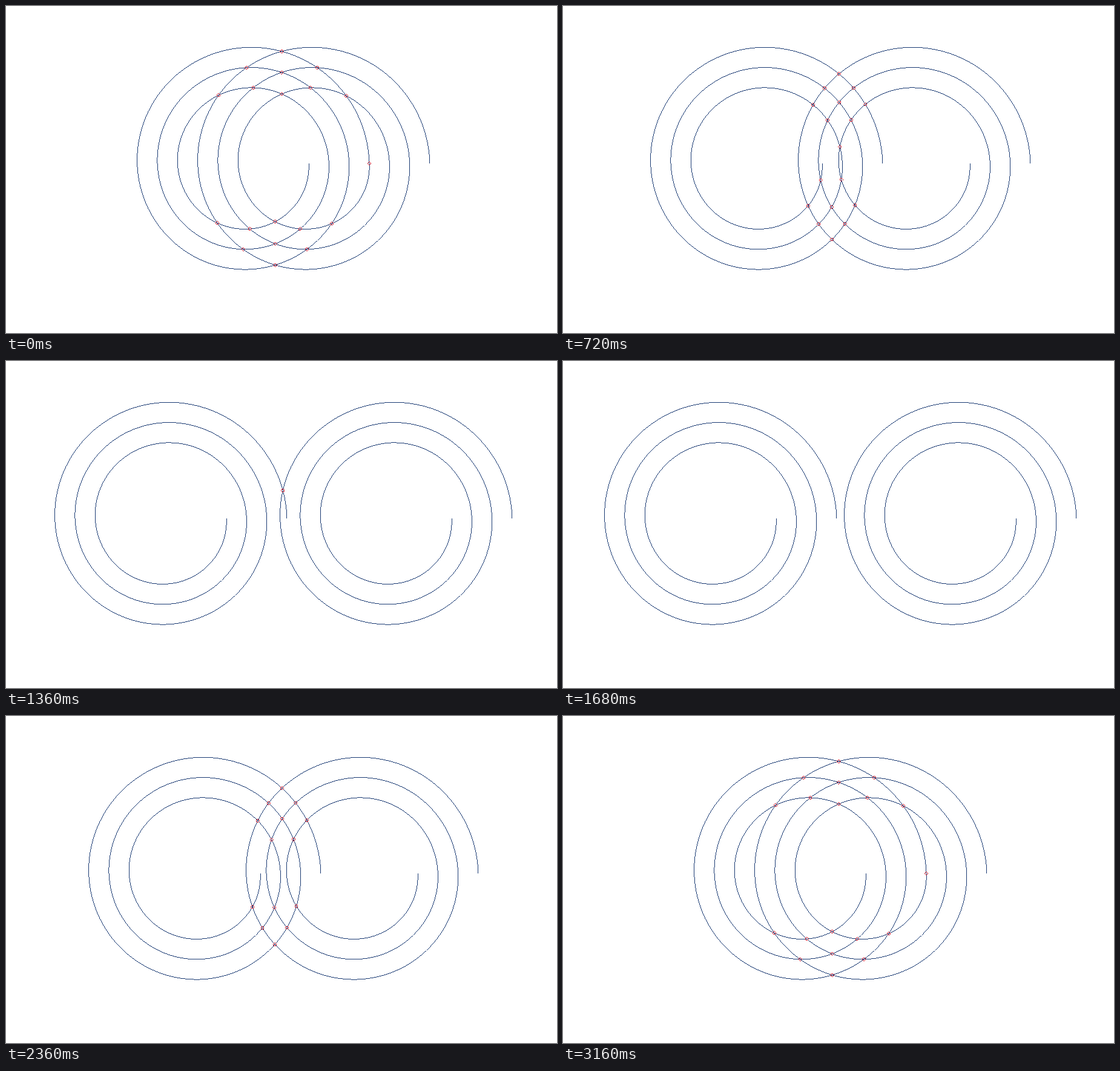
An HTML page with a canvas that plays this animation: 910 px wide and 540 px high, repeating every 3200 ms.

```html
<!DOCTYPE html>
<html lang="en">
<head>
<meta charset="utf-8">
<title>Crossing spirals</title>
<style>
  html, body { margin: 0; width: 100%; height: 100%; overflow: hidden; background: #fff; }
  canvas { display: block; }
</style>
</head>
<body>
<canvas id="stage" width="910" height="540"></canvas>
<script>
const ctx = document.getElementById('stage').getContext('2d');
const STEP = 40, FRAMES = 80, SEGMENTS = 360, TURNS = 3;
const BLUE = '#1c3c74', RED = '#d83040';

function spiral(cx) {
  return Array.from({ length: SEGMENTS + 1 }, (_, i) => {
    const part = i / SEGMENTS, angle = part * TURNS * 2 * Math.PI;
    const radius = 100 + 100 * part;
    return [cx + radius * Math.cos(angle), 260 + radius * Math.sin(angle)];
  });
}

function ring([x, y]) {
  return Array.from({ length: 25 }, (_, i) => {
    const angle = i * Math.PI / 12;
    return [x + 2.5 * Math.cos(angle), y + 2.5 * Math.sin(angle)];
  });
}

// Hard-edged polyline: one pixel for each pixel centre passed along the longer axis.
function drawLine(points, color) {
  ctx.fillStyle = color;
  for (let i = 1; i < points.length; i++) {
    const a = points[i - 1], b = points[i];
    const main = Math.abs(b[0] - a[0]) > Math.abs(b[1] - a[1]) ? 0 : 1;
    const side = 1 - main;
    const slope = (b[side] - a[side]) / (b[main] - a[main]);
    const end = Math.max(a[main], b[main]) - 0.5;
    const pixel = [0, 0];
    for (let m = Math.ceil(Math.min(a[main], b[main]) - 0.5); m < end; m++) {
      pixel[main] = m;
      pixel[side] = Math.floor(a[side] + (m + 0.5 - a[main]) * slope);
      ctx.fillRect(pixel[0], pixel[1], 1, 1);
    }
  }
}

function crossing(a, b, c, d) {
  const ux = b[0] - a[0], uy = b[1] - a[1];
  const vx = d[0] - c[0], vy = d[1] - c[1];
  const wx = c[0] - a[0], wy = c[1] - a[1];
  const det = ux * vy - uy * vx;
  if (Math.abs(det) < 1e-9) return null;
  const s = (wx * vy - wy * vx) / det, t = (wx * uy - wy * ux) / det;
  const within = v => v > -1e-9 && v < 1 + 1e-9;
  return within(s) && within(t) ? [a[0] + s * ux, a[1] + s * uy] : null;
}

function crossings(p, q) {
  const found = [];
  for (let i = 1; i < p.length; i++) {
    for (let j = 1; j < q.length; j++) {
      const hit = crossing(p[i - 1], p[i], q[j - 1], q[j]);
      if (hit) found.push(hit);
    }
  }
  return found;
}

let shown = -1;
function draw() {
  const frame = Math.floor(performance.now() / STEP) % FRAMES;
  if (frame !== shown) {
    shown = frame;
    const shift = 4 * Math.min(frame, FRAMES - 1 - frame);
    const left = spiral(400 - shift), right = spiral(500 + shift);
    ctx.fillStyle = '#fff';
    ctx.fillRect(0, 0, 910, 540);
    drawLine(left, BLUE);
    drawLine(right, BLUE);
    crossings(left, right).forEach(p => drawLine(ring(p), RED));
  }
  requestAnimationFrame(draw);
}
draw();
</script>
</body>
</html>
```
